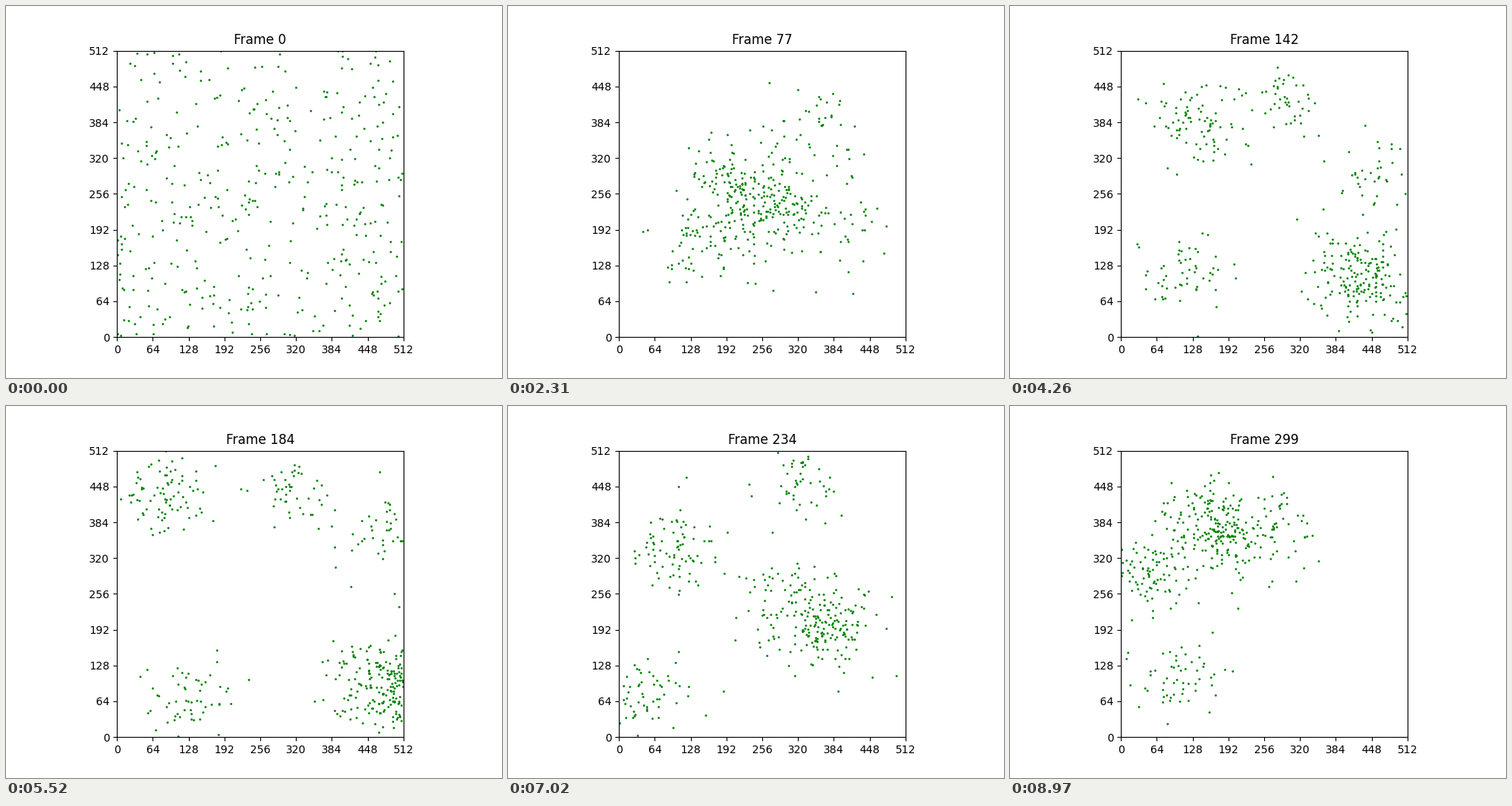
Animation of 640x480 px, one loop 9 s. Source, as a matplotlib script:

```python
import numpy as np
import matplotlib.pyplot as plt
from matplotlib.animation import FuncAnimation

SIZE = 512
FRAMES = 300
DOTS = 400
SPREAD = 38      # distance of members from their flock's path
LAG = 10         # how far members run ahead or trail, in frames
WANDER = 20      # radius of the small circles each dot flies
TURN = 62        # frames per circle

# Way points of the five flocks
TIMES = np.array([77, 142, 184, 234, 299])
ROUTES = np.array([
    [(245, 265), (430, 125), (455, 85), (335, 195), (145, 370)],
    [(210, 275), (150, 385), (85, 420), (85, 320), (35, 270)],
    [(380, 370), (290, 400), (320, 450), (310, 465), (270, 385)],
    [(130, 130), (120, 100), (120, 80), (55, 100), (110, 130)],
    [(400, 170), (430, 280), (485, 350), (420, 180), (190, 355)],
])
SHARES = [0.42, 0.2, 0.15, 0.14, 0.09]

rng = np.random.default_rng(5)
flock = rng.choice(len(ROUTES), DOTS, p=SHARES)
start = rng.uniform(0, SIZE, (DOTS, 2))
offset = rng.normal(0, SPREAD, (DOTS, 2))
lag = rng.normal(0, LAG, DOTS)
gather = rng.uniform(70, 140, DOTS)
phase = 2 * flock + rng.normal(0, 0.5, DOTS)
side = np.where(flock % 2, 1, -1)
slopes = np.gradient(ROUTES.astype(float), TIMES, axis=1)


def fold(p):
    """Reflect positions off the walls."""
    return SIZE - np.abs(SIZE - np.abs(p))


def smoothstep(u):
    u = np.clip(u, 0, 1)
    return u * u * (3 - 2 * u)


def follow(t):
    """Point of each dot's route at its own time, by a cubic through the way points."""
    t = np.clip(t, TIMES[0], TIMES[-1])
    k = np.clip(np.searchsorted(TIMES, t, side="right") - 1, 0, len(TIMES) - 2)
    h = (TIMES[k + 1] - TIMES[k])[:, None]
    u = (t - TIMES[k])[:, None] / h
    s = smoothstep(u)
    bend = h * u * (1 - u) * ((1 - u) * slopes[flock, k] - u * slopes[flock, k + 1])
    return (1 - s) * ROUTES[flock, k] + s * ROUTES[flock, k + 1] + bend


def circle(t):
    a = side * 2 * np.pi * t / TURN + phase
    return WANDER * np.column_stack([np.cos(a), np.sin(a)])


def positions(t):
    joined = smoothstep(t / gather)[:, None]
    goal = fold(follow(t - lag) + offset)
    return fold(start + joined * (goal - start) + circle(t) - circle(0) * (1 - joined))


fig, ax = plt.subplots(figsize=(6.4, 4.8), dpi=100)
ax.set_aspect("equal")
ax.set(xlim=(0, SIZE), ylim=(0, SIZE))
ticks = np.arange(0, SIZE + 1, 64)
ax.set_xticks(ticks)
ax.set_yticks(ticks)
dots, = ax.plot([], [], "o", color="green", markersize=1)
title = ax.set_title("Frame 0")


def update(i):
    dots.set_data(*positions(i).T)
    title.set_text(f"Frame {i}")
    return dots, title


anim = FuncAnimation(fig, update, frames=FRAMES, interval=30, repeat=True,
                     repeat_delay=0)
plt.show()
```
